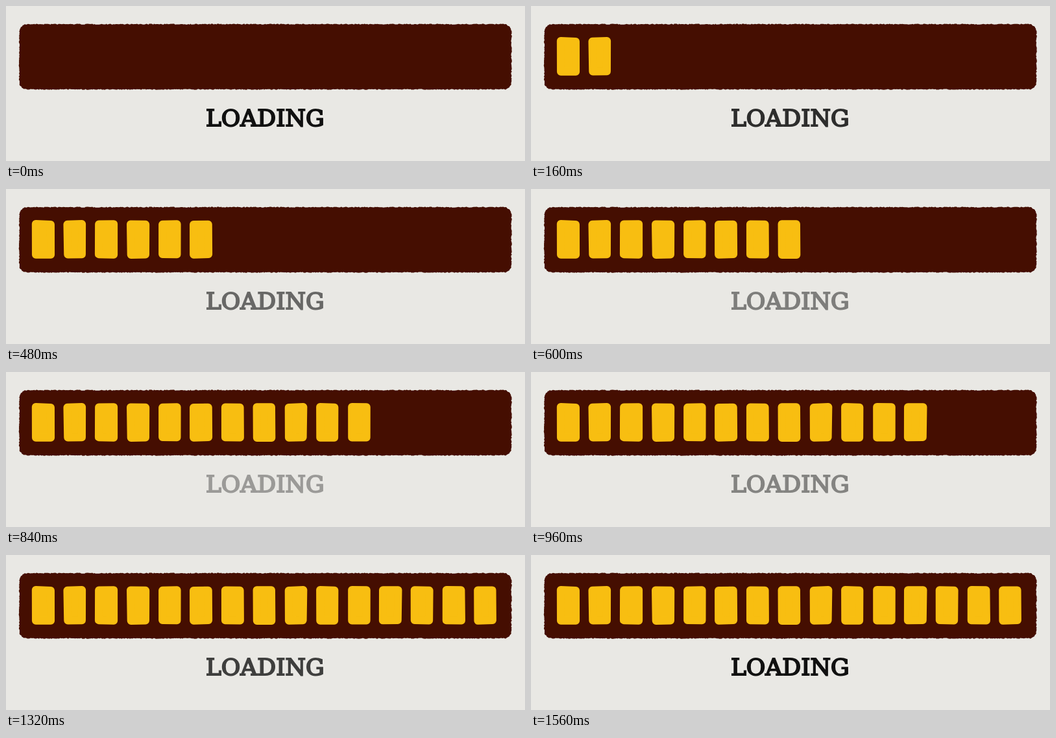
An HTML page that plays this animation: 800x240 px, repeating every 1600 ms.

```html
<!DOCTYPE html>
<html lang="en">
<head>
<meta charset="utf-8">
<title>Loading</title>
<style>
  html, body { margin: 0; width: 100%; height: 100%; overflow: hidden; background: #e9e8e4; }
  svg { display: block; }
  #bar { fill: #450e01; }
  #blocks path { fill: #f8be11; stroke: #f8be11; stroke-width: 12; stroke-linejoin: round; }
  #label {
    font: 36px "DejaVu Serif", serif;
    text-anchor: middle; fill: #111; stroke: #111; stroke-width: 2;
  }
</style>
</head>
<body>
<svg width="800" height="240" viewBox="0 0 800 240">
  <path id="bar"/>
  <g id="blocks"></g>
  <text id="label" x="399.3" y="186">LOADING</text>
</svg>
<script>
const LOOP = 1600, STEP = 40, BLOCK_TIME = 80;
const COUNT = 15, PITCH = 48.66;
const FADE_PEAK = 800, FADE_END = 1560, FADE_DEPTH = .68;
const bar = document.getElementById('bar');
const blocks = document.getElementById('blocks');
const label = document.getElementById('label');

let seed = 7;
const random = () => (seed = seed * 16807 % 2147483647) / 2147483647;
const jitter = size => (random() - .5) * 2 * size;
const newPath = () => document.createElementNS('http://www.w3.org/2000/svg', 'path');
const toPath = points => 'M' + points.map(p => p.map(v => v.toFixed(2)).join()).join('L') + 'Z';

// Torn edge: walk a rounded rectangle and jitter every point.
function roughRect(left, top, right, bottom, radius) {
  const guide = newPath();
  const arc = (x, y) => `a${radius},${radius} 0 0 1 ${x * radius},${y * radius}`;
  guide.setAttribute('d', `M${left + radius},${top}H${right - radius}${arc(1, 1)}V${bottom - radius}` +
    `${arc(-1, 1)}H${left + radius}${arc(-1, -1)}V${top + radius}${arc(1, -1)}Z`);
  const points = [], length = guide.getTotalLength();
  for (let s = 0; s < length; s += 1.8) {
    const p = guide.getPointAtLength(s);
    points.push([p.x + jitter(.7), p.y + jitter(.7)]);
  }
  return toPath(points);
}

// Hand-cut block: a rectangle with loose corners, rounded by its stroke.
function looseBlock(left) {
  const right = left + 23.8, top = 54.5, bottom = 101.5;
  const corner = (x, y, inward) => [x + inward * random() * 1.2, y + jitter(.5)];
  return toPath([
    corner(left, top, 1), corner(right, top, -1),
    corner(right, bottom, -1), corner(left, bottom, 1)
  ]);
}

bar.setAttribute('d', roughRect(20.4, 28.1, 779.2, 129.1, 12));
for (let i = 0; i < COUNT; i++) {
  const block = newPath();
  block.setAttribute('d', looseBlock(45.6 + i * PITCH));
  blocks.append(block);
}

function draw() {
  const t = Math.floor(performance.now() % LOOP / STEP) * STEP;
  const filled = Math.floor((t + STEP) / BLOCK_TIME);
  [...blocks.children].forEach((block, i) => {
    block.style.display = i < filled ? '' : 'none';
  });
  const fade = t < FADE_PEAK ? t / FADE_PEAK : (FADE_END - t) / (FADE_END - FADE_PEAK);
  label.setAttribute('opacity', 1 - FADE_DEPTH * fade);
  requestAnimationFrame(draw);
}
draw();
</script>
</body>
</html>
```
